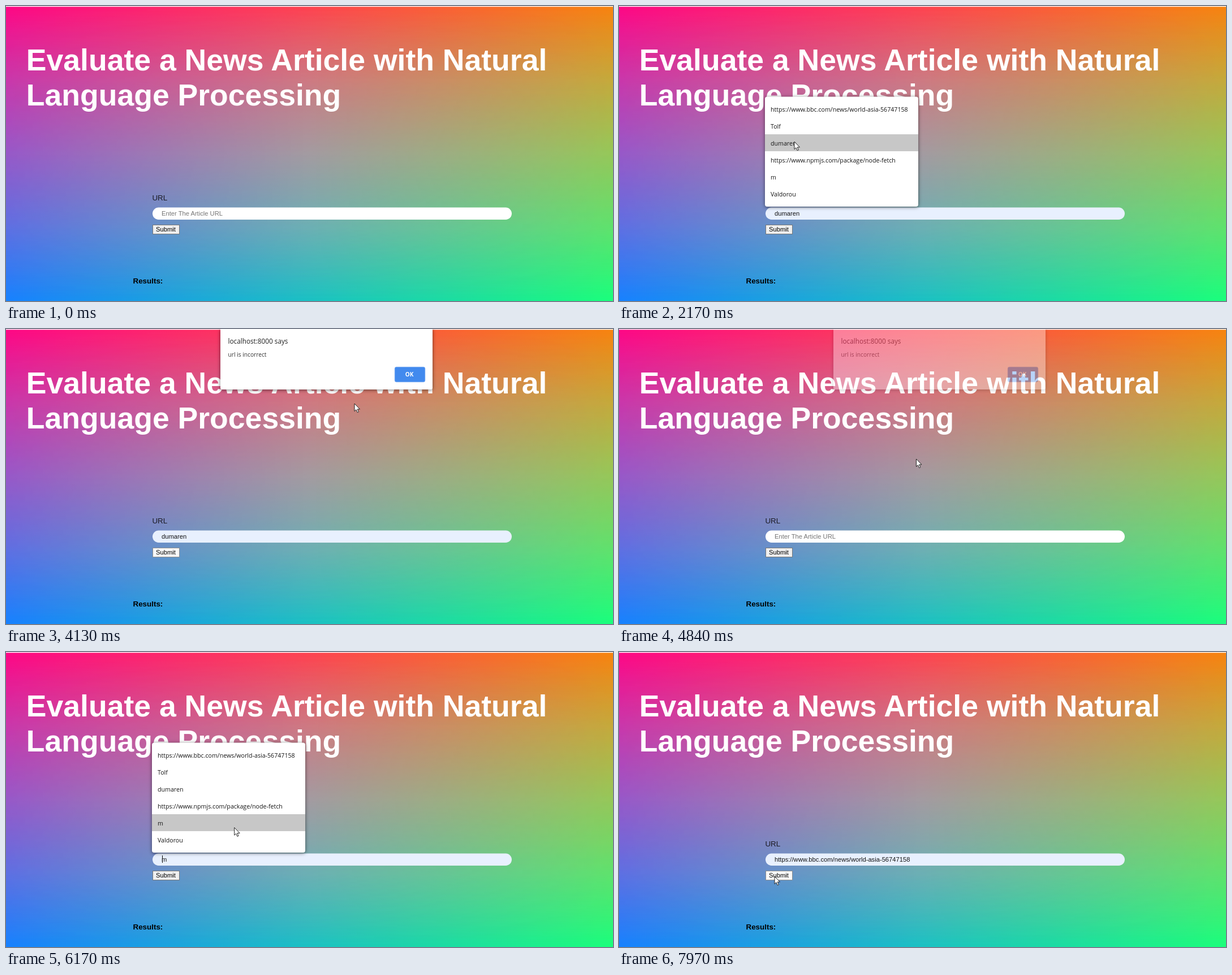
An HTML page that plays this animation: 1073 px wide and 522 px high, repeating every 8 s.

```html
<!DOCTYPE html>
<html lang="en">
<head>
<meta charset="utf-8">
<title>Evaluate a News Article</title>
<style>
  html, body { margin: 0; width: 100%; height: 100%; overflow: hidden; }
  body { position: relative; background: linear-gradient(90deg, #ff0886, #ff4350 50%, #f88410); }
  body::before, body::after { content: ""; position: absolute; inset: 0; }
  body::before {
    background: linear-gradient(90deg, #1782ff, #1ac2c4 50%, #1aff7c);
    -webkit-mask-image: linear-gradient(transparent, #000);
    mask-image: linear-gradient(transparent, #000);
  }
  /* Pale haze across the middle */
  body::after {
    background: linear-gradient(#fff0, #ffffff26 25%, #ffffff33 50%, #ffffff26 75%, #fff0);
    -webkit-mask-image: linear-gradient(90deg, #0008, #000 50%, #0008);
    mask-image: linear-gradient(90deg, #0008, #000 50%, #0008);
  }
  svg { position: absolute; z-index: 1; left: 0; top: 0; display: block; }
  text { font: 11.2px "Liberation Sans", Arial, sans-serif; white-space: pre; }
  .title { font-size: 53.55px; font-weight: bold; fill: #fff; }
  .label { font-size: 13.4px; fill: #1c1c24; }
  .results { font-size: 13.4px; font-weight: bold; }
  .ui text { font-family: "Open Sans", "Noto Sans", sans-serif; font-size: 10.65px; fill: #161616; }
  .ui .heading { font-size: 11.75px; fill: #222; }
  .ui .message { font-size: 10.2px; fill: #333; }
  .ui .ok { font-size: 10px; font-weight: bold; fill: #fff; text-anchor: middle; }
  .ui { filter: drop-shadow(0 1px 3px rgba(0, 0, 0, .55)); }
</style>
</head>
<body>
<svg width="1073" height="522" viewBox="0 0 1073 522">
  <rect width="1073" height="1.3" fill="#fff"/>
  <text class="title" x="35.8" y="114">Evaluate a News Article with Natural</text>
  <text class="title" x="35.8" y="176">Language Processing</text>
  <text class="label" x="258.4" y="344.3">URL</text>
  <rect id="field" x="259" y="356.5" width="635" height="21.5" rx="10.75"/>
  <text id="value" x="275" y="370.7"></text>
  <path id="caret" d="M0 360v13" stroke="#000"/>
  <rect id="button" x="259.5" y="387.5" width="47" height="16"/>
  <text x="265" y="399">Submit</text>
  <text class="results" x="224.5" y="491">Results:</text>

  <g id="popup" class="ui">
    <rect x="258" y="160.5" width="271" height="194.5" rx="4" fill="#fff"/>
    <rect id="highlight" x="258" width="271" height="30" fill="#c7c7c7"/>
  </g>

  <g id="alert" class="ui">
    <path d="M379 0H754V104a3 3 0 0 1-3 3H382a3 3 0 0 1-3-3z" fill="#fff"/>
    <text class="heading" x="392.5" y="26">localhost:8000 says</text>
    <text class="message" x="392.5" y="49">url is incorrect</text>
    <rect x="687" y="67" width="54" height="27" rx="3" fill="#428aee" stroke="#b9d3f8" stroke-width=".7"/>
    <text class="ok" x="713" y="84">OK</text>
  </g>

  <path id="arrow" d="M0 0v13.5l3-2.8 2.2 5 2.2-1-2.2-4.8h4.3z" fill="#fff" stroke="#111" stroke-width=".9"/>
  <path id="beam" d="M-3-6h2.2L0-5.2l.8-.8H3M-3 7h2.2L0 6.2l.8.8H3M0-5.2V6.2" fill="none" stroke="#111" stroke-width="1.1"/>
</svg>
<script>
const LOOP = 8000;
const $ = id => document.getElementById(id);
const set = (id, attrs) => {
  for (const name in attrs) $(id).setAttribute(name, attrs[name]);
};
const show = (id, opacity) => set(id, { opacity: Number(opacity) });

const entries = [
  "https://www.bbc.com/news/world-asia-56747158", "Tolf", "dumaren",
  "https://www.npmjs.com/package/node-fetch", "m", "Valdorou"
];
const ROW_TOP = 167, ROW_HEIGHT = 30;
entries.forEach((entry, i) => {
  const row = document.createElementNS("http://www.w3.org/2000/svg", "text");
  row.textContent = entry;
  row.setAttribute("x", 268);
  row.setAttribute("y", ROW_TOP + i * ROW_HEIGHT + 20);
  $("popup").append(row);
});

// Pointer moves: first step, last step, number of steps, destination x, y
const moves = [
  [440, 590, 3, 829, 339],
  [760, 910, 3, 511, 410],
  [1060, 1210, 3, 491, 371],
  [1940, 2170, 4, 310, 240],
  [2570, 2720, 3, 309, 353],
  [2890, 3100, 3, 290, 391],
  [3350, 3580, 4, 409, 388],
  [3810, 3960, 3, 611, 135],
  [4130, 4130, 1, 616, 132],
  [4210, 4430, 4, 713, 80],
  [4660, 4920, 4, 463, 280],
  [5150, 5230, 2, 422, 386],
  [5400, 5550, 3, 417, 371],
  [6090, 6470, 6, 377, 190],
  [7190, 7270, 2, 299, 444],
  [7490, 7570, 2, 290, 405],
  [7720, 7810, 2, 275, 397]
];

function pointerAt(t) {
  let x = 1180, y = 600;
  for (const [start, end, steps, toX, toY] of moves) {
    if (t < start) break;
    const gap = (end - start) / (steps - 1 || 1) || 1;
    const part = Math.min(steps, Math.floor((t - start) / gap + 1.01)) / steps;
    x += (toX - x) * part;
    y += (toY - y) * part;
  }
  return [x, y];
}

const within = (t, a, b) => t >= a && t < b;
const ramp = (t, a, b) => Math.max(0, Math.min(1, (t - a) / (b - a)));

function valueAt(t, hovered) {
  if (hovered >= 0) return entries[hovered];
  if (within(t, 2570, 4740)) return entries[2];
  return t >= 7020 ? entries[0] : "";
}

function draw(t) {
  const [x, y] = pointerAt(t);
  const open = within(t, 1700, 2570) || within(t, 5800, 7020);
  const row = Math.floor((y - ROW_TOP) / ROW_HEIGHT);
  const hovered = open && row in entries ? row : -1;
  const value = valueAt(t, hovered);

  set("field", { fill: value ? "#e8f0fe" : "#fff" });
  $("value").textContent = value || "Enter The Article URL";
  set("value", { fill: value ? "#111" : "#757575" });

  const chosen = within(t, 2570, 3070) || within(t, 7020, 7520);
  const caret = chosen || within(t, 1610, 2110) || within(t, 5680, 6250) || within(t, 6790, 7020);
  const caretX = chosen ? 276 + $("value").getComputedTextLength() : 276.5;
  set("caret", { transform: `translate(${caretX})` });
  show("caret", caret);

  const pressed = within(t, 3270, 4740) || t >= 7970;
  const overButton = x > 259 && x < 307 && y > 387 && y < 404;
  set("button", {
    fill: pressed ? "#f8f8f8" : overButton ? "#e5e5e5" : "#efefef",
    stroke: pressed ? "#8d8d8d" : overButton ? "#4f4f4f" : "#767676"
  });

  show("popup", open ? 1 : within(t, 2570, 2650) ? .4 : 0);
  show("highlight", hovered >= 0);
  set("highlight", { y: ROW_TOP + Math.max(0, hovered) * ROW_HEIGHT });
  show("alert", ramp(t, 3350, 3560) * (1 - ramp(t, 4740, 4900)));

  const overField = x > 259 && x < 894 && y > 356.5 && y < 378;
  const place = { transform: `translate(${x} ${y})` };
  set("arrow", place);
  set("beam", place);
  show("arrow", !overField);
  show("beam", overField);
}

function tick() {
  draw(performance.now() % LOOP);
  requestAnimationFrame(tick);
}
tick();
</script>
</body>
</html>
```
